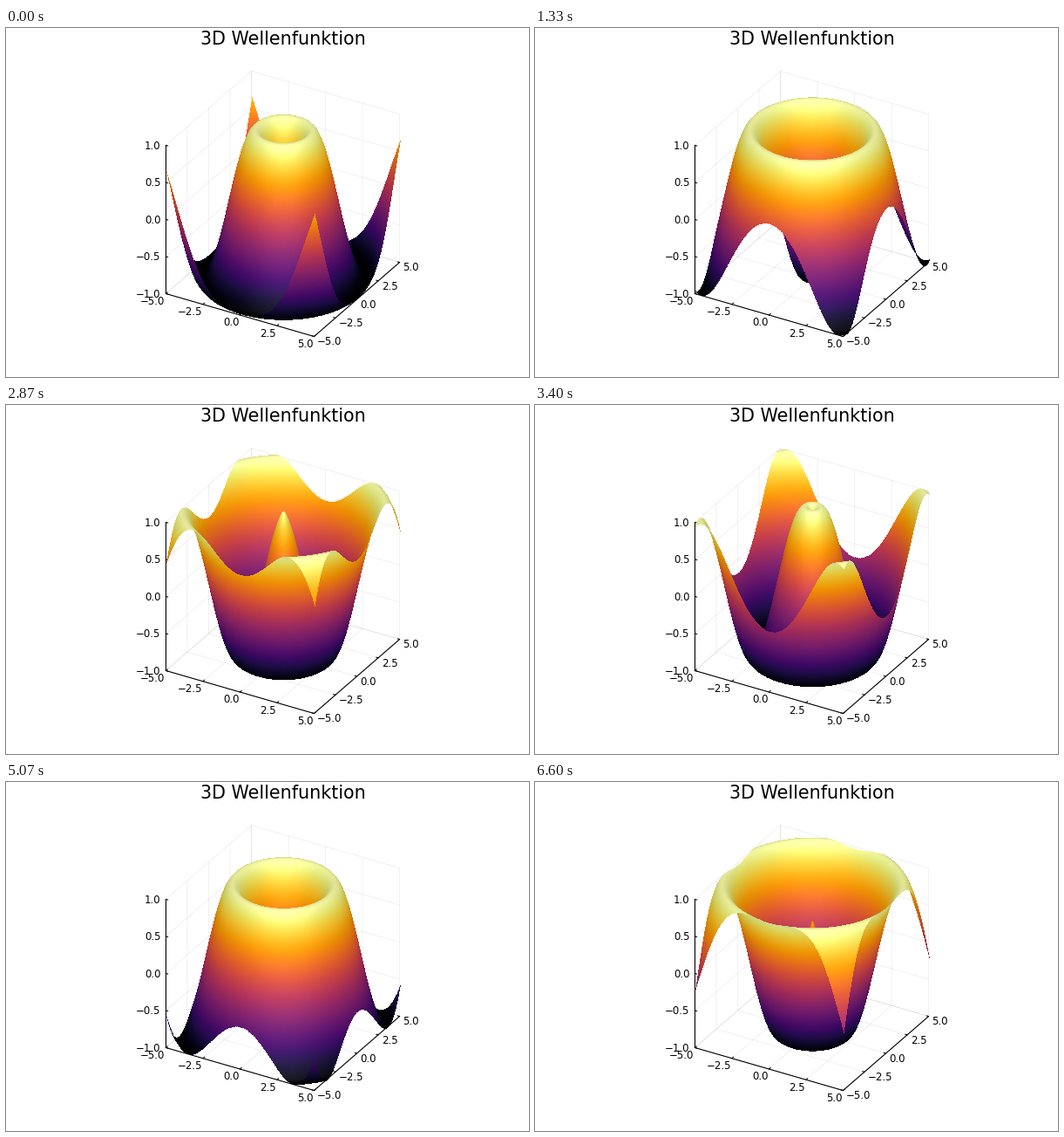
These frames come from a looping animation (600x400 px, 6.67 s). A matplotlib script:

```python
from functools import lru_cache

import numpy as np
import matplotlib.pyplot as plt
from matplotlib.animation import FuncAnimation

W, H = 600, 400
STEPS, LOOP_MS = 100, 6670
TICKS = 3                        # animation ticks per wave step
CX, CY = 318.5, 201.5            # screen position of the surface centre
BOX_CX = CX - 1                  # the axes box sits one pixel further left
UNIT = 170 / (10 * np.cos(np.pi / 6))
C30, S30 = np.cos(np.pi / 6), 0.5
Z_PX = 85                        # pixels per unit of height
R_MIN = 0.0714                   # the sampled grid straddles the origin
LEFT, RIGHT, TOP, BOTTOM = 184, 453, 40, 360

plt.rcParams["font.family"] = "DejaVu Sans"
fig = plt.figure(figsize=(W / 100, H / 100), dpi=100, facecolor="white")
ax = fig.add_axes([0, 0, 1, 1])
ax.set_axis_off()


def project(x, y, z):
    """Orthographic view, azimuth 30 and elevation 30 degrees."""
    px = BOX_CX + UNIT * (C30 * x + S30 * y)
    py = CY + UNIT * S30 * (S30 * x - C30 * y) - Z_PX * z
    return px, py


def path(*points, **style):
    px, py = zip(*(project(*p) for p in points))
    ax.plot(px, py, solid_capstyle="butt", **style)


def label(px, py, value, ha):
    text = f"{value:.1f}".replace("-", "\u2212")
    ax.text(px, py + 4.3, text, ha=ha, va="baseline", fontsize=8.5)


def tick(start, dx, dy):
    px, py = start
    ax.plot([px, px + dx], [py, py + dy], color="black", lw=0.75)


def draw_box():
    grid = dict(color="black", alpha=0.1, lw=0.4, zorder=1)
    axis = dict(color="black", lw=0.8, zorder=1.5)
    xy_ticks = np.linspace(-5, 5, 5)
    z_ticks = np.linspace(-1, 1, 5)

    for v in xy_ticks:
        path((v, -5, -1), (v, 5, -1), (v, 5, 1), **grid)
        path((5, v, -1), (-5, v, -1), (-5, v, 1), **grid)
    for v in z_ticks:
        path((-5, -5, v), (-5, 5, v), (5, 5, v), **grid)

    path((-5, -5, 1), (-5, -5, -1), **axis)
    path((-5, -5, -1), (5, -5, -1), **axis)
    path((5, -5, -1), (5, 5, -1), **axis)

    for v in xy_ticks:
        px, py = project(v, -5, -1)
        tick((px, py), 1.7, -1.5)
        label(px - 1, py + 8, v, "right")
        px, py = project(5, v, -1)
        tick((px, py), -2.2, -0.6)
        label(px + 3.7, py + 5.5, v, "left")
    for v in z_ticks:
        px, py = project(-5, -5, v)
        tick((px, py), 2.2, 0.6)
        label(px - 6, py, v, "right")


def sample_rays():
    """Points of the square along each pixel column, ordered back to front."""
    cols = np.arange(LEFT, RIGHT)
    depth = np.linspace(-6.84, 6.84, 1650)[:, None]
    u = ((cols + 0.5 - CX) / UNIT)[None, :]
    x = C30 * u + S30 * depth
    y = S30 * u - C30 * depth
    inside = (np.abs(x) <= 5.01) & (np.abs(y) <= 5.01)
    r = np.maximum(np.hypot(x, y), R_MIN)[inside]
    d = np.broadcast_to(depth, x.shape)[inside]
    col = np.broadcast_to(cols - LEFT, x.shape)[inside]
    return col, d, r


col, depth, radius = sample_rays()
base_y = CY + UNIT * S30 * depth - TOP
facing = depth / radius
inferno = plt.get_cmap("inferno")


@lru_cache(maxsize=1)
def render(step):
    t = 0.1 * (step + 1)
    w, h = RIGHT - LEFT, BOTTOM - TOP
    z = np.sin(radius - t)
    row = (base_y - Z_PX * z).astype(int)
    nearest = np.full(w * h, -1)
    nearest[row * w + col] = np.arange(z.size)   # nearer points overwrite
    seen = np.flatnonzero(nearest >= 0)
    k = nearest[seen]

    # Headlight: ambient, diffuse and a soft white highlight
    slope = 5 * np.cos(radius[k] - t)
    light = np.abs(S30 - C30 * slope * facing[k]) / np.sqrt(1 + slope**2)
    rgb = inferno((z[k] + 1) / 2)[:, :3]
    rgb = rgb * (0.8 + 0.2 * light)[:, None] + 0.1 * (light**10)[:, None]

    image = np.zeros((w * h, 4), np.uint8)
    image[seen, :3] = np.clip(rgb, 0, 1) * 255
    image[seen, 3] = 255
    return image.reshape(h, w, 4)


draw_box()
ax.text(CX - 0.5, 19, "3D Wellenfunktion", ha="center", va="baseline",
        fontsize=14.9)
surface = ax.imshow(render(0), extent=(LEFT, RIGHT, BOTTOM, TOP),
                    interpolation="nearest", aspect="auto", zorder=2)
ax.set_xlim(0, W)
ax.set_ylim(H, 0)


def update(i):
    # The wave moves in hard steps, each starting one tick early
    surface.set_data(render(min((i + 1) // TICKS, STEPS - 1)))
    return (surface,)


anim = FuncAnimation(fig, update, frames=STEPS * TICKS,
                     interval=LOOP_MS / (STEPS * TICKS),
                     repeat=True, repeat_delay=0, blit=False)
plt.show()
```
